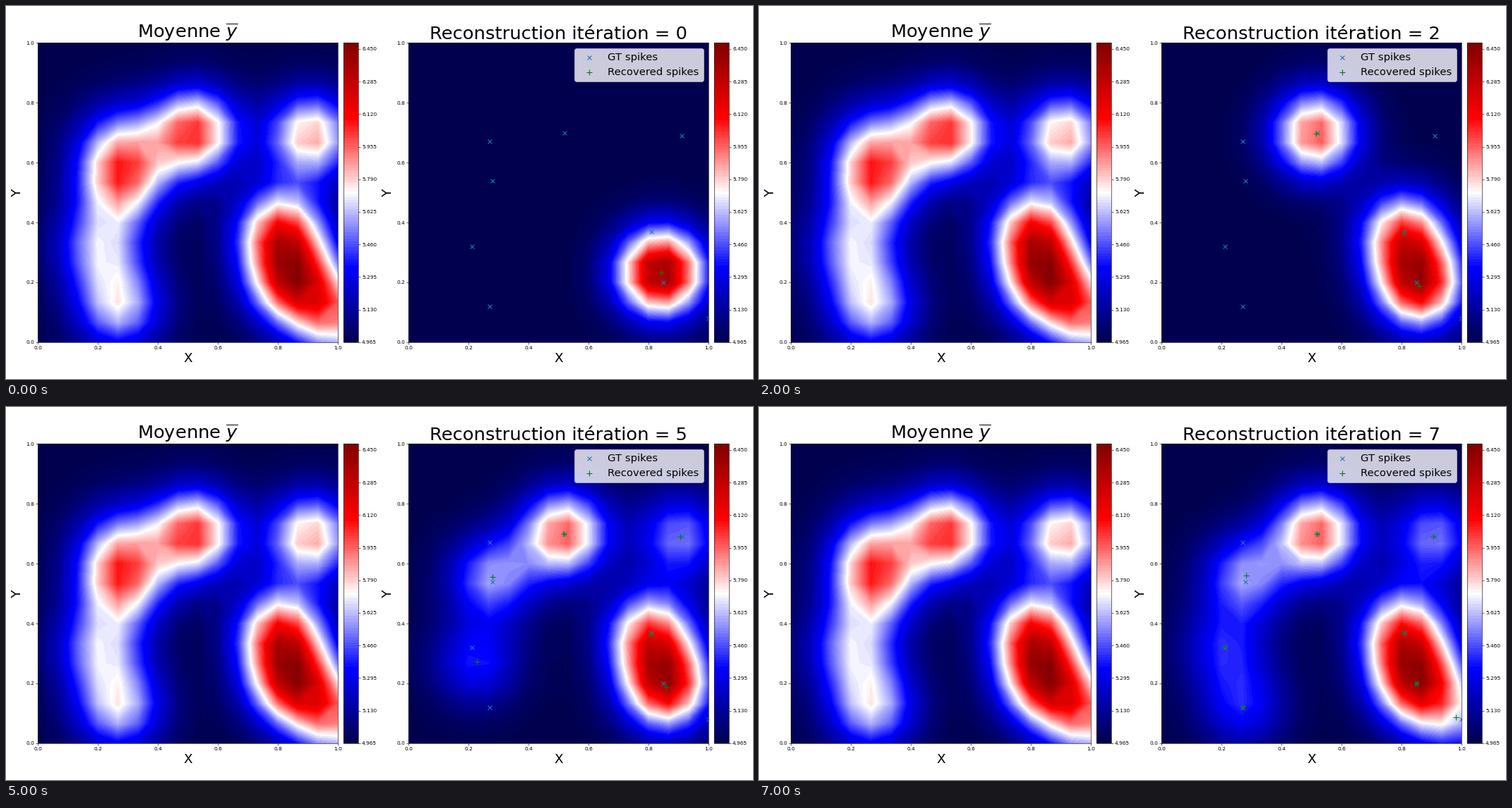
Recreate the animation shown at these times as a matplotlib script. Size 1058 by 529 pixels, loop 8000 ms.

```python
import numpy as np
import matplotlib.pyplot as plt
from matplotlib.animation import FuncAnimation

W, H = 1058, 529
SIDE, BOTTOM, TOP = 424.5, 476.9, 52.4
SIGMA, BACKGROUND = 0.1, 4.968
LEVELS = 4.965 + 0.015 * np.arange(102)
grid = np.linspace(0, 1, 16)
X, Y = np.meshgrid(grid, grid)

# Spikes are (x, y, amplitude)
TRUTH = [(0.27, 0.12, 0.71), (0.21, 0.32, 0.62), (0.28, 0.54, 0.86),
         (0.27, 0.67, 0.46), (0.52, 0.70, 1.10), (0.91, 0.69, 0.92),
         (0.81, 0.37, 1.05), (0.85, 0.20, 1.145), (1.0, 0.08, 0.80)]

LONE = (0.842, 0.234, 1.52)
PAIR = [(0.808, 0.363, 1.0), (0.859, 0.188, 1.25)]
RIGHT = (0.906, 0.69, 0.57)
CENTRE = (0.518, 0.70, 1.04)
BEND = (0.279, 0.555, 0.61)
LOWER_LEFT = [(0.211, 0.323, 0.38), (0.27, 0.122, 0.39)]
ITERATIONS = [
    [LONE],
    [LONE, (0.516, 0.698, 1.08)],
    [(0.514, 0.698, 1.06), *PAIR],
    [(0.515, 0.698, 1.06), *PAIR, RIGHT],
    [(0.517, 0.701, 1.04), *PAIR, RIGHT, (0.278, 0.548, 0.63)],
    [CENTRE, *PAIR, RIGHT, BEND, (0.227, 0.272, 0.41)],
    [CENTRE, *PAIR, RIGHT, BEND, *LOWER_LEFT],
    [CENTRE, (0.807, 0.37, 1.02), (0.849, 0.20, 1.16), RIGHT,
     (0.281, 0.56, 0.60), *LOWER_LEFT, (0.981, 0.088, 0.50)],
]


def field(spikes):
    z = BACKGROUND + sum(
        a * np.exp(-((X - x) ** 2 + (Y - y) ** 2) / (2 * SIGMA ** 2))
        for x, y, a in spikes)
    return np.clip(z, LEVELS[0] + 1e-4, LEVELS[-1] - 1e-4)


def positions(spikes):
    return np.array(spikes)[:, :2]


def draw_field(ax, spikes):
    return ax.contourf(X, Y, field(spikes), levels=LEVELS, cmap="seismic")


def pixel_axes(left, width):
    return fig.add_axes([left / W, 1 - BOTTOM / H, width / W, (BOTTOM - TOP) / H])


def make_panel(left, spikes):
    ax = pixel_axes(left, SIDE)
    contours = draw_field(ax, spikes)
    ax.set_xlim(0, 1)
    ax.set_ylim(0, 1)
    ax.set_xlabel("X", fontsize=25)
    ax.set_ylabel("Y", fontsize=25)
    cax = pixel_axes(left + SIDE + 7.9, SIDE * 0.05)
    fig.colorbar(contours, cax=cax, ticks=LEVELS[::11], format="%.3f")
    return ax, contours


plt.rcParams["font.family"] = "DejaVu Sans"
fig = plt.figure(figsize=(20, 10), dpi=52.9)

mean_ax, _ = make_panel(45.4, TRUTH)
mean_ax.set_title(r"Moyenne $\overline{y}$", fontsize=35)

rec_ax, rec_contours = make_panel(570.4, ITERATIONS[0])
title = rec_ax.set_title("Reconstruction itération = 0", fontsize=35)
rec_ax.scatter(*positions(TRUTH).T, marker="x", s=64, zorder=2,
               label="GT spikes")
recovered = rec_ax.scatter(*positions(ITERATIONS[0]).T, marker="+", s=128,
                           c="g", zorder=2.1, label="Recovered spikes")
rec_ax.legend(loc="upper right", fontsize=20)


def update(i):
    global rec_contours
    rec_contours.remove()
    rec_contours = draw_field(rec_ax, ITERATIONS[i])
    rec_ax.set_xlim(0, 1)
    rec_ax.set_ylim(0, 1)
    recovered.set_offsets(positions(ITERATIONS[i]))
    title.set_text(f"Reconstruction itération = {i}")
    return rec_contours, recovered, title


anim = FuncAnimation(fig, update, frames=len(ITERATIONS), interval=1000,
                     repeat=True, repeat_delay=0, blit=False)
plt.show()
```
